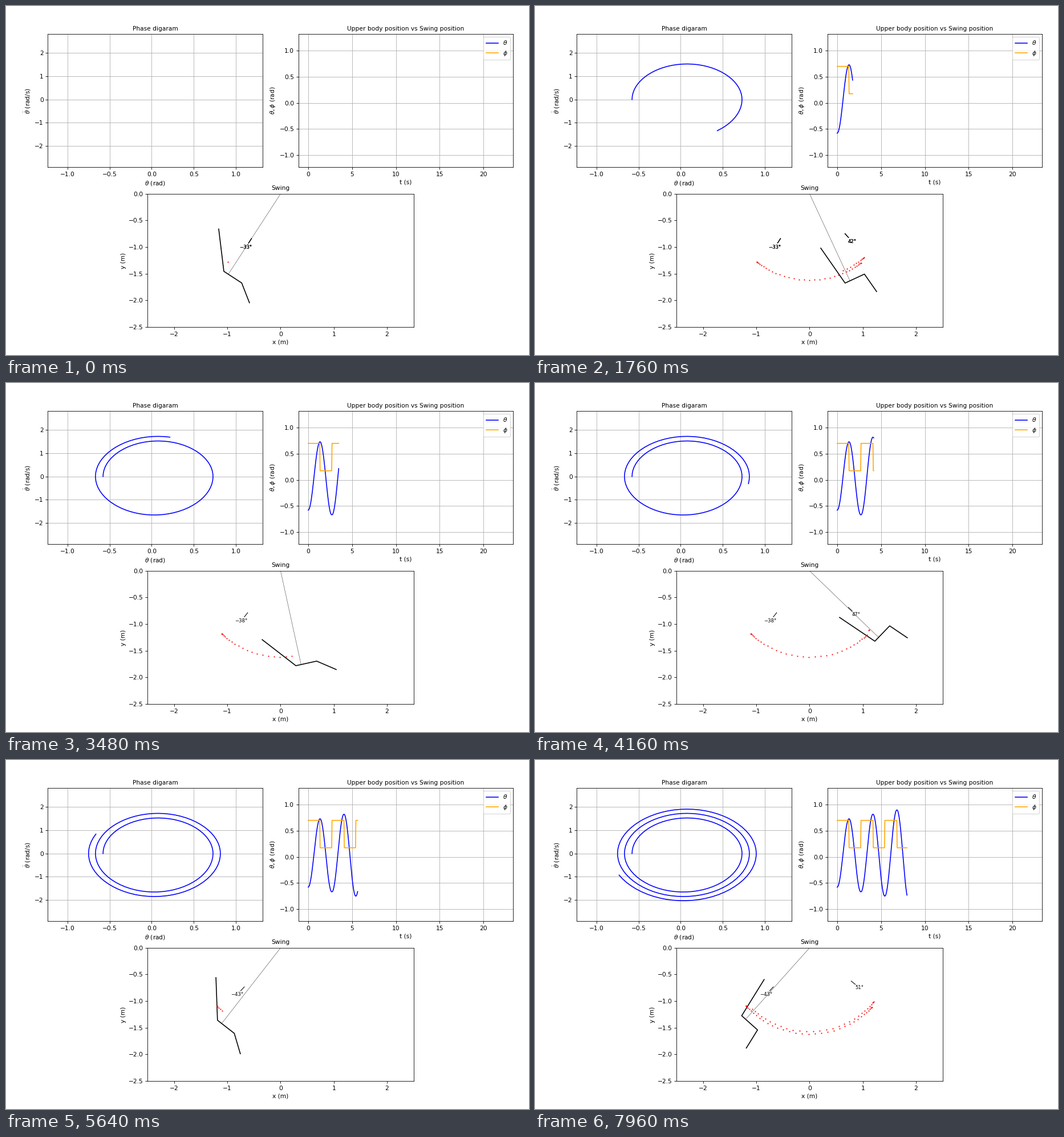
Write a matplotlib script that moves like this. It is 917 by 611 pixels and loops after 8 s.

```python
import numpy as np
import matplotlib.pyplot as plt
from matplotlib.animation import FuncAnimation

DPI = 76.375
N, STEP = 200, 40

# Half swings: start time, duration, and the turning angles between them
START = np.array([0, 1.353, 2.717, 4.086, 5.435, 6.817])
DUR = np.array([1.350, 1.336, 1.3615, 1.344, 1.371, 1.356])
TURN = np.array([-0.577, 0.728, -0.667, 0.8155, -0.749, 0.897, -0.831])

# Posture on the way forward and on the way back
LEAN = np.radians([40, 10])
SHIN = np.array([0.95, np.radians(10)])
COM_R = np.array([1.617, 1.571])
COM_OFF = np.radians([-4.9, -1.25])
ROPE = 1.8


def polar(r, angle):
    """Point at distance r from the pivot, angle measured from straight down."""
    return np.array([r * np.sin(angle), -r * np.cos(angle)])


def motion(t):
    """Angle, angular speed and half-swing index of a large-amplitude pendulum."""
    seg = np.searchsorted(START, t, side="right") - 1
    a, b = TURN[seg], TURN[seg + 1]
    amp = (a - b) / 2
    e = amp ** 3 / 192
    x = np.pi * np.minimum((t - START[seg]) / DUR[seg], 1)
    theta = (a + b) / 2 + amp * np.cos(x) + e * (np.cos(x) - np.cos(3 * x))
    speed = -np.pi / DUR[seg] * (amp * np.sin(x) + e * (np.sin(x) - 3 * np.sin(3 * x)))
    return theta, speed, seg


def body(theta, pose):
    seat = polar(ROPE, theta)
    across = polar(1, theta + np.pi / 2)
    hip, knee = seat - 0.1 * across, seat + 0.3 * across
    head = hip - polar(0.8, theta + LEAN[pose])
    foot = knee + polar(0.4, theta + SHIN[pose])
    return np.array([head, hip, knee, foot]).T


time = np.arange(N) * STEP / 1000
theta, speed, seg = motion(time)
pose = seg % 2
lean = LEAN[pose]
com = polar(COM_R[pose], theta + COM_OFF[pose])

fig = plt.figure(figsize=((917 + 1e-6) / DPI, (611 + 1e-6) / DPI), dpi=DPI)
grid = fig.add_gridspec(2, 2, left=0.08, right=0.97, bottom=0.08, top=0.92,
                        wspace=0.166, hspace=0.2)


def panel(cell, title, xlabel, ylabel, xlim, ylim):
    ax = fig.add_subplot(cell)
    ax.set_title(title, fontsize=10)
    ax.set(xlabel=xlabel, ylabel=ylabel, xlim=xlim, ylim=ylim)
    return ax


phase_ax = panel(grid[0, 0], "Phase digaram", r"$\theta$ (rad)",
                 r"$\dot{\theta}$ (rad/s)", (-1.232, 1.318), (-2.913, 2.826))
time_ax = panel(grid[0, 1], "Upper body position vs Swing position", "t (s)",
                r"$\theta, \phi$ (rad)", (-1.115, 23.4), (-1.228, 1.318))
swing_ax = panel(grid[1, :], "Swing", "x (m)", "y (m)", (-2.5, 2.5), (-2.5, 0))
phase_ax.grid()
time_ax.grid()
swing_ax.set_aspect("equal")

phase_line, = phase_ax.plot([], [], "b")
theta_line, = time_ax.plot([], [], "b", label=r"$\theta$")
lean_line, = time_ax.plot([], [], "orange", label=r"$\phi$")
time_ax.legend(loc="upper right")

rope, = swing_ax.plot([], [], "k", lw=0.4)
figure, = swing_ax.plot([], [], "k", lw=1.5)
trail, = swing_ax.plot([], [], "ro", ms=1)

# Left and right peak marks; the first cycle is overprinted and looks heavier
COPIES = 3
marks = [[(swing_ax.plot([], [], "k", lw=1)[0],
           swing_ax.text(0, 0, "", fontsize=8, ha="center", va="center"))
          for _ in range(COPIES)] for _ in range(2)]


def show_mark(side, half, visible):
    angle = TURN[half]
    ends = np.array([polar(1.0, angle), polar(1.1, angle)]).T
    label = f"{np.degrees(angle):.0f}°".replace("-", "\u2212")
    for k, (tick, text) in enumerate(marks[side]):
        on = visible and (k == 0 or half < 2)
        tick.set_data(*ends)
        text.set_position(polar(1.2, angle))
        text.set_text(label)
        tick.set_visible(on)
        text.set_visible(on)


def draw(i):
    upto = slice(0, i + 1)
    phase_line.set_data(theta[upto], speed[upto])
    theta_line.set_data(time[upto], theta[upto])
    lean_line.set_data(time[upto], lean[upto])

    seat = polar(ROPE, theta[i])
    rope.set_data([0, seat[0]], [0, seat[1]])
    figure.set_data(*body(theta[i], pose[i]))

    # Trail and marks restart at every left turning point
    cycle = seg[i] - pose[i]
    first = np.searchsorted(seg, cycle)
    trail.set_data(*com[:, first:i + 1])
    show_mark(0, cycle, True)
    show_mark(1, cycle + 1, pose[i] == 1)


anim = FuncAnimation(fig, draw, frames=N, interval=STEP, init_func=lambda: draw(0),
                     repeat=True, repeat_delay=0)
plt.show()
```
